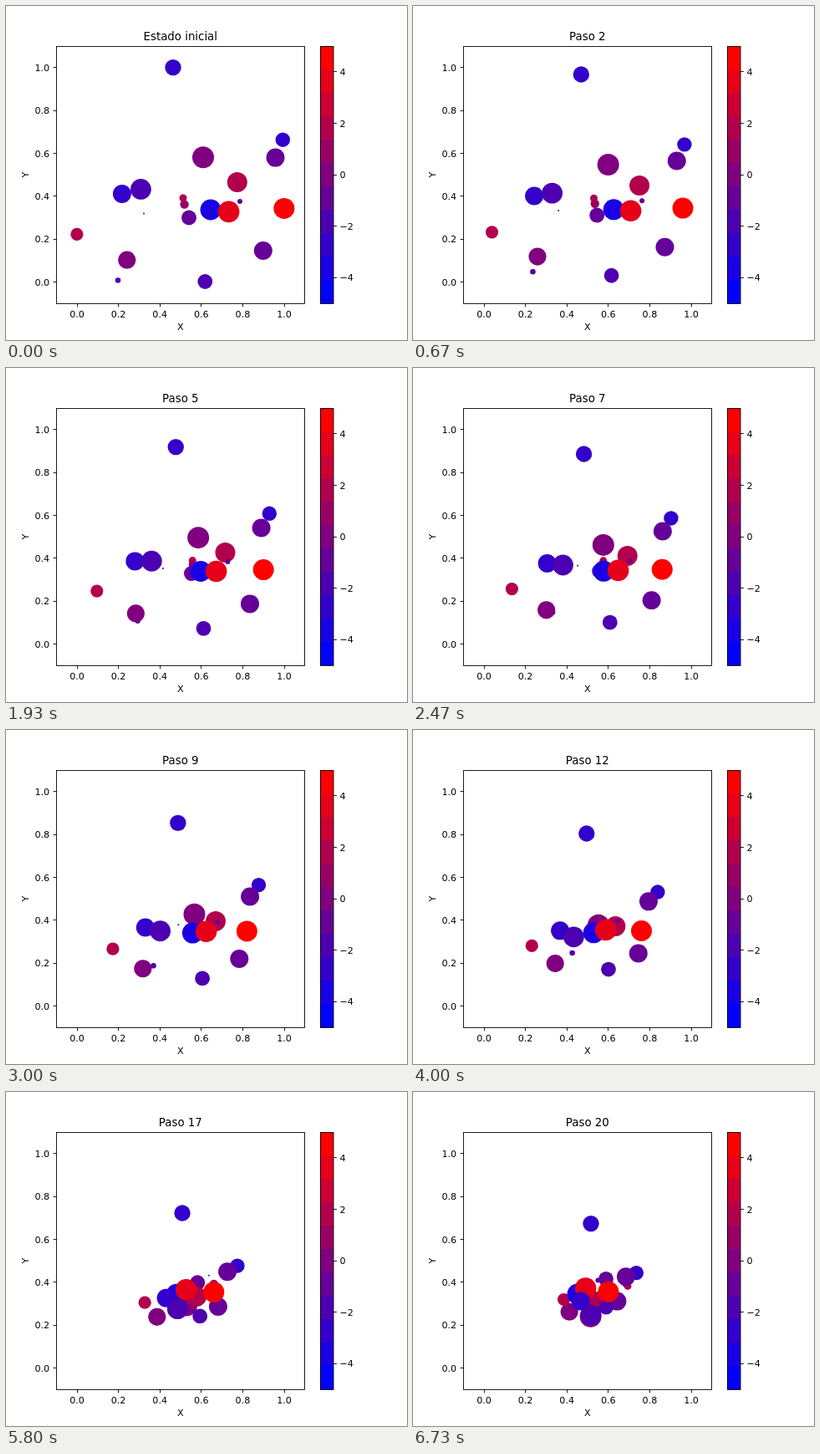
An HTML page for the animation above (6990 ms loop, 480x400 px).

```html
<!DOCTYPE html>
<html lang="es">
<head>
<meta charset="utf-8">
<title>Partículas</title>
<style>
  html, body { margin: 0; width: 100%; height: 100%; overflow: hidden; background: #fff; }
  svg { display: block; }
  text { font: 11.11px "DejaVu Sans", sans-serif; fill: #000; }
  #title { font-size: 13.33px; }
  .mid { text-anchor: middle; }
  .end { text-anchor: end; }
  .line { fill: none; stroke: #000; stroke-width: .89; }
</style>
</head>
<body>
<svg width="480" height="400" viewBox="0 0 480 400">
  <g id="bar" shape-rendering="crispEdges"></g>
  <g id="balls"></g>
  <g id="axes">
    <rect class="line" x="60.5" y="48.5" width="297" height="308"/>
    <rect class="line" x="376.5" y="48.5" width="15.5" height="308"/>
    <text class="mid" x="208.8" y="388">X</text>
    <text class="mid" transform="translate(27 202) rotate(-90)">Y</text>
  </g>
  <text id="title" class="mid" x="208.8" y="41.3">Estado inicial</text>
</svg>
<script>
const LOOP = 6990, STEPS_PER_MS = 3 / 1000, LEVELS = 11;
const byId = id => document.getElementById(id);

function add(parent, tag, attrs, text) {
  const el = document.createElementNS('http://www.w3.org/2000/svg', tag);
  for (const key in attrs) el.setAttribute(key, attrs[key]);
  if (text !== undefined) el.textContent = text;
  return byId(parent).appendChild(el);
}

// Discrete blue-to-red colour map
function levelColor(i) {
  const red = Math.round(255 * i / (LEVELS - 1));
  return `rgb(${red},0,${255 - red})`;
}

// Colour bar
for (let i = 0; i < LEVELS; i++) {
  add('bar', 'rect', {
    x: 376, width: 16, y: 48 + 28 * (LEVELS - 1 - i), height: 28, fill: levelColor(i)
  });
}
for (let v = -4; v <= 4; v += 2) {
  const y = 202 - v * 30.8;
  add('axes', 'path', { class: 'line', d: `M392 ${Math.floor(y) + .5}h3.9` });
  add('axes', 'text', { x: 399.4, y: y + 4.2 }, String(v).replace('-', '\u2212'));
}

// Axis ticks
for (let i = 0; i <= 5; i++) {
  const label = (i / 5).toFixed(1), x = 85 + 49.6 * i, y = 330.3 - 51.3 * i;
  add('axes', 'path', {
    class: 'line',
    d: `M${Math.floor(x) + .5} 356.5v3.9M60.5 ${Math.floor(y) + .5}h-3.9`
  });
  add('axes', 'text', { class: 'mid', x, y: 373 }, label);
  add('axes', 'text', { class: 'end', x: 52.2, y: y + 4.2 }, label);
}

// x, y, dx and dy per step, radius, colour level; back to front
const balls = [
  [134, 328.5, 4.72, -5.13, 3.3, 3],
  [165, 248.5, 4.58, -1.69, 1, 2],
  [212, 230, 2.25, .12, 4.5, 7],
  [213.6, 237.6, 2.07, -.45, 5.2, 6],
  [331.3, 160.2, -3.2, 2.82, 8.7, 2],
  [219, 253.5, .6, -1.48, 9, 4],
  [236, 181.3, -1.17, 4.37, 13, 5],
  [144.8, 304.2, 2.12, -2.05, 10.6, 5],
  [84.9, 273.3, 4.78, -1.24, 7.6, 7],
  [276.8, 211, -2.87, 2, 12, 7],
  [280, 234, -2.93, -.42, 3, 4],
  [245, 244, -2.4, -.1, 12.5, 1],
  [307.8, 293, -3.17, -2.12, 11, 4],
  [322.5, 181.6, -3.38, 1.98, 11, 4],
  [266.6, 246.4, -3, -.57, 12.8, 9],
  [238.3, 330, -.36, -3.62, 8.9, 3],
  [138.9, 225, 3.1, 1.28, 11, 2],
  [161.4, 219.4, 2.58, 2.37, 12.4, 3],
  [332.9, 242.4, -4.95, -.16, 12.5, 10],
  [200, 73.6, .65, 4.2, 9.7, 2]
].map(([x, y, dx, dy, r, level]) => ({
  dx, dy, el: add('balls', 'circle', { cx: x, cy: y, r, fill: levelColor(level) })
}));

let shown = 0;
function draw() {
  const t = performance.now() % LOOP;
  const step = Math.floor((t + 3.4) * STEPS_PER_MS);
  if (step !== shown) {
    shown = step;
    byId('title').textContent = step ? `Paso ${step}` : 'Estado inicial';
    for (const { dx, dy, el } of balls) {
      el.setAttribute('transform', `translate(${dx * step} ${dy * step})`);
    }
  }
  requestAnimationFrame(draw);
}
draw();
</script>
</body>
</html>
```
